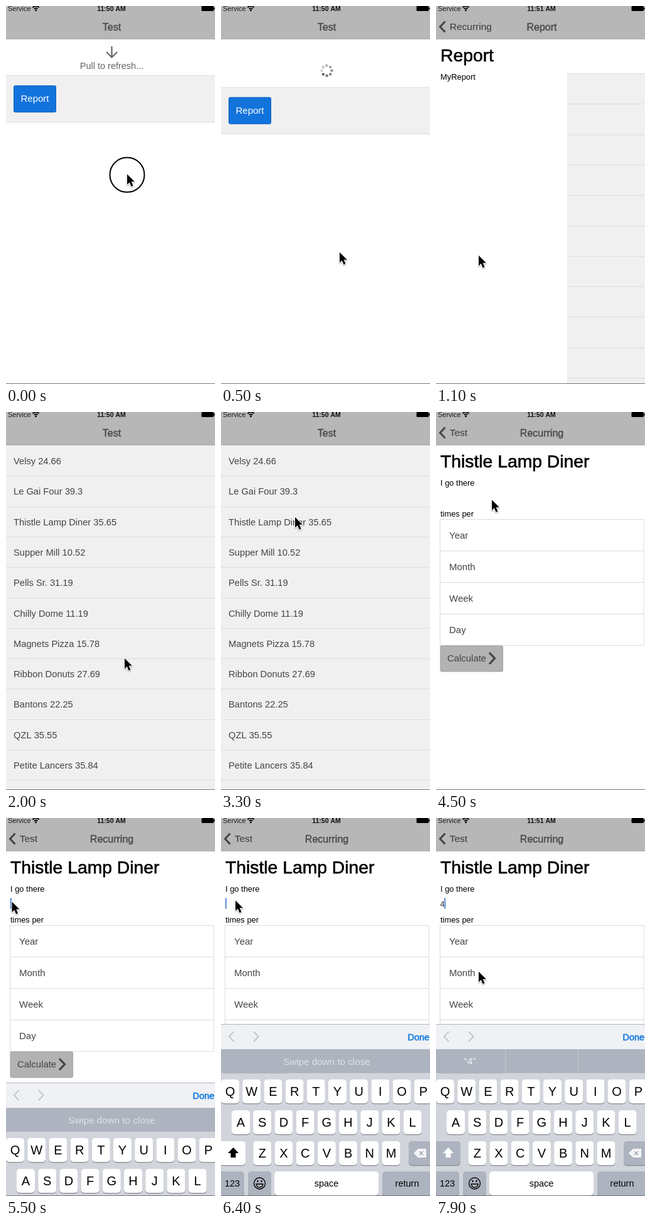
An HTML page with a canvas for the animation above (8000 ms loop, 333 by 600 pixels).

```html
<!DOCTYPE html>
<html lang="en">
<head>
<meta charset="utf-8">
<title>Expense list</title>
<style>
html, body { margin: 0; width: 100%; height: 100%; overflow: hidden; background: #fff; }
canvas { display: block; width: 333px; height: 600px; }
</style>
</head>
<body>
<canvas id="stage"></canvas>
<script>
const W = 333, H = 600, LOOP = 8000, STEP = 100, TOP = 53, ROW = 48.3;
const INK = '#444', LINE = '#dcdcdc';
const FONT = '"Liberation Sans", Arial, sans-serif';
const canvas = document.getElementById('stage');
const c = canvas.getContext('2d');
const dpr = window.devicePixelRatio || 1;
canvas.width = W * dpr;
canvas.height = H * dpr;

const places = [
  'Velsy 24.66', 'Le Gai Four 39.3', 'Thistle Lamp Diner 35.65', 'Supper Mill 10.52',
  'Pells Sr. 31.19', 'Chilly Dome 11.19', 'Magnets Pizza 15.78', 'Ribbon Donuts 27.69',
  'Bantons 22.25', 'QZL 35.55', 'Petite Lancers 35.84'
];

// Pointer stops: time, x, y
const path = [
  [0, 193, 267], [400, 189, 391], [2100, 189, 391], [2900, 118, 167],
  [4300, 118, 167], [4700, 60, 112], [5100, 9.5, 133], [5500, 9.5, 133],
  [6000, 23, 131], [6400, 23, 131], [6600, 33, 134], [6800, 33, 134],
  [7700, 62, 205], [7900, 68, 244]
];

const clamp = v => Math.max(0, Math.min(1, v));
const mix = (a, b, p) => a + (b - a) * p;
const span = (t, from, to) => clamp((t - from) / (to - from));
const easeOut = (p, n) => 1 - Math.pow(1 - p, n);

// cubic-bezier(.36, .66, .04, 1)
function pushEase(x) {
  const curve = (s, a, b) => 3 * s * (1 - s) * (1 - s) * a + 3 * s * s * (1 - s) * b + s * s * s;
  let lo = 0, hi = 1;
  for (let i = 0; i < 24; i++) {
    const mid = (lo + hi) / 2;
    if (curve(mid, .36, .04) < x) lo = mid; else hi = mid;
  }
  return x <= 0 ? 0 : x >= 1 ? 1 : curve(lo, .66, 1);
}

function pointerAt(t) {
  let i = 0;
  while (i < path.length - 2 && path[i + 1][0] <= t) i++;
  const [t0, x0, y0] = path[i], [t1, x1, y1] = path[i + 1];
  const p = span(t, t0, t1);
  return [mix(x0, x1, p), mix(y0, y1, p)];
}

function rect(x, y, w, h, fill) {
  c.fillStyle = fill;
  c.fillRect(x, y, w, h);
}

function round(x, y, w, h, r, fill, border) {
  c.beginPath();
  c.roundRect(x, y, w, h, r);
  c.fillStyle = fill;
  c.fill();
  if (border) {
    c.strokeStyle = border;
    c.lineWidth = 1;
    c.stroke();
  }
}

function line(points, color, width) {
  c.beginPath();
  points.forEach(([x, y]) => c.lineTo(x, y));
  c.strokeStyle = color;
  c.lineWidth = width;
  c.stroke();
}

// "heavy" thickens the strokes to a medium weight
function text(str, x, y, size, color, { align = 'left', bold = false, heavy = 0 } = {}) {
  c.font = (bold ? 'bold ' : '') + size + 'px ' + FONT;
  c.textAlign = align;
  c.fillStyle = color;
  c.fillText(str, x, y);
  if (heavy) {
    c.strokeStyle = color;
    c.lineWidth = heavy;
    c.lineJoin = 'round';
    c.strokeText(str, x, y);
    c.lineJoin = 'miter';
  }
}

function layer(alpha, draw) {
  c.save();
  c.globalAlpha *= alpha;
  draw();
  c.restore();
}

function statusBar(clock) {
  text('Service', 3, 8, 11, '#1c1c1c');
  text(clock, 168, 8, 10.5, '#111', { align: 'center', bold: true });
  c.strokeStyle = '#000';
  c.lineWidth = 1.8;
  for (const r of [3.6, 6.8]) {
    c.beginPath();
    c.arc(47.5, 7, r, -Math.PI * .77, -Math.PI * .23);
    c.stroke();
  }
  c.beginPath();
  c.arc(47.5, 6.8, 1.5, 0, 7);
  c.fillStyle = '#000';
  c.fill();
  round(311.5, 0, 19.5, 8, 1.5, '#000');
  rect(331.5, 2.5, 1.5, 3, '#000');
}

function bar(clock) {
  rect(0, 0, W, TOP, '#b7b7b7');
  rect(0, TOP - 1, W, 1, '#adadad');
  statusBar(clock);
}

const title = (str, x) => text(str, x, 38.5, 16, '#4b4b4b', { align: 'center', heavy: .45 });
const backText = str => text(str, 21.7, 38, 15.5, INK, { heavy: .15 });
const backArrow = () => line([[14.5, 24.5], [6.5, 33], [14.5, 41.5]], INK, 3);

function refresher(offset, flip, spin, busy) {
  const base = TOP + offset;
  c.save();
  c.beginPath();
  c.rect(0, TOP, W, offset);
  c.clip();
  if (busy) {
    for (let i = 0; i < 8; i++) {
      const a = i * Math.PI / 4 + spin;
      c.beginPath();
      c.arc(168.5 + 8 * Math.cos(a), base - 27 + 8 * Math.sin(a), 2.2, 0, 7);
      c.fillStyle = `rgba(102,102,102,${.3 + i * .1})`;
      c.fill();
    }
  } else {
    c.save();
    c.translate(168.5, base - 38);
    c.rotate(flip * Math.PI);
    line([[0, -9], [0, 8]], '#666', 2.2);
    line([[-8.5, 0], [0, 8.5], [8.5, 0]], '#666', 2.2);
    c.restore();
    text('Pull to refresh...', 168.5, base - 11, 14.5, '#666', { align: 'center' });
  }
  c.restore();
}

function emptyList(offset) {
  const y = TOP + offset;
  rect(0, y, W, 73.5, '#f0f0f0');
  rect(0, y - 1, W, 1, LINE);
  rect(0, y + 73, W, 1, LINE);
  round(12.5, y + 15.5, 67, 42, 2, '#1273dc', '#0c62bd');
  text('Report', 46, y + 41, 15, '#fff', { align: 'center' });
}

function list(offset, active) {
  const y = TOP + offset;
  rect(0, y, W, H - y, '#f0f0f0');
  for (let i = 0; i < 12; i++) {
    const top = y + i * ROW;
    if (active && i === 2) rect(0, top, W, ROW, '#dadada');
    if (i || offset) rect(0, Math.round(top), W, 1, LINE);
    if (places[i]) text(places[i], 12, top + 30, 14.7, INK);
  }
}

function heading(str) {
  text(str, 7, 87.5, 28.3, '#000', { heavy: .6 });
}

function form(value, caret) {
  rect(0, TOP, W, H - TOP, '#fff');
  heading('Thistle Lamp Diner');
  text('I go there', 7, 117, 12.9, '#000');
  if (value) text(value, 6.5, 140.5, 13.2, '#333');
  if (caret) rect(value ? 13.5 : 7, 127, 1.6, 17, '#3a74d0');
  text('times per', 7, 166, 12.9, '#000');
  ['Year', 'Month', 'Week', 'Day'].forEach((name, i) => {
    const y = 170 + i * 50;
    c.strokeStyle = LINE;
    c.lineWidth = 1;
    c.strokeRect(6.5, y + .5, 324.5, 50);
    text(name, 21, y + 31, 15, INK);
  });
  round(7, 371, 99.5, 41, 2, '#b2b2b2', '#a3a3a3');
  text('Calculate', 18, 396, 14.9, INK);
  line([[85, 382], [93.5, 391], [85, 400]], INK, 3.2);
}

function report() {
  rect(0, TOP, 209, H - TOP, '#fff');
  heading('Report');
  text('MyReport', 7, 117, 12.9, '#000');
}

function key(x, y, w, label, size, fill = '#fff') {
  round(x, y + 1.2, w, 38, 5, '#888c92');
  round(x, y, w, 38, 5, fill);
  if (label) text(label, x + w / 2, y + 19 + size * .36, size, '#000', { align: 'center' });
}

function shiftKey(on) {
  key(-6, 513, 45, '', 0, on ? '#fff' : '#adb3bf');
  c.beginPath();
  [[19.5, 523], [28, 532], [23.5, 532], [23.5, 539], [15.5, 539], [15.5, 532], [11, 532]]
    .forEach(([x, y]) => c.lineTo(x, y));
  c.fillStyle = on ? '#000' : '#fff';
  c.fill();
}

function deleteKey() {
  key(299, 513, 46, '', 0, '#adb3bf');
  c.beginPath();
  [[307, 532], [314, 525], [327, 525], [327, 539], [314, 539]].forEach(([x, y]) => c.lineTo(x, y));
  c.fillStyle = '#f4f5f7';
  c.fill();
  line([[316, 529], [322, 535]], '#9aa1ad', 1.4);
  line([[322, 529], [316, 535]], '#9aa1ad', 1.4);
}

function emojiKey() {
  key(43, 561, 37, '', 0, '#adb3bf');
  c.strokeStyle = '#000';
  c.fillStyle = '#000';
  c.lineWidth = 1.4;
  c.beginPath();
  c.arc(61.5, 580, 9, 0, 7);
  c.stroke();
  c.beginPath();
  c.arc(61.5, 581, 5.4, 0, Math.PI);
  c.closePath();
  c.stroke();
  for (const x of [58.5, 64.5]) {
    c.beginPath();
    c.ellipse(x, 576.5, 1.1, 1.7, 0, 0, 7);
    c.fill();
  }
}

function keyboard(shift, caps, suggest) {
  c.save();
  c.translate(0, Math.round(shift));
  rect(0, 327, W, 40, '#eff1f4');
  rect(0, 327, W, 1, '#b4b6b9');
  line([[20.5, 339], [13, 347], [20.5, 355]], '#b8bcc2', 1.7);
  line([[52, 339], [59.5, 347], [52, 355]], '#b8bcc2', 1.7);
  text('Done', 297.5, 352.5, 14.4, '#0f78e0', { heavy: .5 });
  rect(0, 367, W, 38.5, '#adb3bf');
  if (suggest) {
    rect(110.5, 368, 1, 37, '#c6cad2');
    rect(225.5, 368, 1, 37, '#c6cad2');
    text('\u201c4\u201d', 54, 390.5, 15.5, '#f3f4f6', { align: 'center' });
  } else {
    text('Swipe down to close', 168.5, 391.5, 15.2, '#dfe2e7', { align: 'center' });
  }
  rect(0, 405.5, W, 195, '#d1d5db');
  [['QWERTYUIOP', 0, 415], ['ASDFGHJKL', 17, 464], ['ZXCVBNM', 51.3, 513]].forEach(([keys, x, y]) =>
    [...keys].forEach((k, i) => key(x + i * 34.2, y, 29, k, 20)));
  shiftKey(caps);
  deleteKey();
  key(-6, 561, 43, '', 0, '#adb3bf');
  text('123', 18, 585, 14.5, '#000', { align: 'center' });
  emojiKey();
  key(85, 561, 166, 'space', 14.5);
  key(257, 561, 79, 'return', 14.5, '#adb3bf');
  c.restore();
}

function pointer(x, y) {
  c.save();
  c.translate(x, y);
  c.scale(1.06, 1.06);
  c.beginPath();
  [[0, 0], [0, 15.5], [3.6, 12.2], [6.2, 18.4], [9, 17.2], [6.4, 11.2], [11.2, 11.2]]
    .forEach(([px, py]) => c.lineTo(px, py));
  c.closePath();
  c.shadowColor = 'rgba(0,0,0,.35)';
  c.shadowBlur = 2 * dpr;
  c.shadowOffsetY = dpr;
  c.lineJoin = 'round';
  c.lineWidth = 2;
  c.strokeStyle = '#fff';
  c.stroke();
  c.shadowColor = 'transparent';
  c.fillStyle = '#000';
  c.fill();
  c.restore();
}

function listScene(t) {
  const drag = 58 + (pointerAt(t)[1] - 267) * .4;
  const settle = easeOut(span(t, 400, 800), 3);
  let offset = t <= 400 ? drag : mix(drag, 54, settle);
  if (t >= 1600) offset = 54 * (1 - easeOut(span(t, 1600, 2000), 2));
  if (offset > 0) refresher(offset, span(t, 0, 200), t / 160, t >= 500);
  if (t < 700) emptyList(offset); else list(offset, t >= 3400);
}

function pushScene(t) {
  const p = pushEase(span(t, 3542, 4142));
  c.save();
  c.translate(-114 * p, 0);
  list(0, true);
  c.restore();
  rect(0, TOP, W, H - TOP, `rgba(0,0,0,${.1 * p})`);
  const x = Math.round(W * (1 - p));
  if (x > 0) {
    const g = c.createLinearGradient(x - 8, 0, x, 0);
    g.addColorStop(0, 'rgba(0,0,0,0)');
    g.addColorStop(1, 'rgba(0,0,0,.28)');
    rect(x - 8, TOP, 8, H - TOP, g);
  }
  c.save();
  c.translate(x, 0);
  form('', false);
  c.restore();
  bar('11:50 AM');
  const swap = span(p, .8, 1);
  layer((1 - .7 * p) * (1 - swap), () => title('Test', mix(168.5, 36, p)));
  layer(swap, () => backText('Test'));
  layer(p, () => { backArrow(); title('Recurring', 168.5 + 205 * (1 - p)); });
}

function formScene(t) {
  form(t >= 6500 ? '4' : '', t >= 5400);
  const up = easeOut(span(t, 5382, 5882), 4);
  if (up > 0) keyboard(273 * (1 - up), t < 6500, t >= 6900);
  bar(t >= 7800 ? '11:51 AM' : '11:50 AM');
  backArrow();
  backText('Test');
  title('Recurring', 168.5);
}

function draw(t) {
  c.setTransform(dpr, 0, 0, dpr, 0, 0);
  rect(0, 0, W, H, '#fff');
  let [x, y] = pointerAt(t);
  if (t < 3500) {
    listScene(t);
    const inReport = t >= 1100 && t < 1600;
    bar(inReport ? '11:51 AM' : '11:50 AM');
    if (inReport) {
      report();
      if (t >= 1400) rect(209, TOP, 107, H - TOP, '#fff');
      backArrow();
      backText('Recurring');
      title('Report', 168.5);
      [x, y] = [68, 396];
    } else {
      title('Test', 168.5);
    }
  } else if (t < 4200) {
    pushScene(t);
  } else {
    formScene(t);
  }
  rect(0, 599, W, 1, '#777');
  if (t < 500) {
    c.beginPath();
    c.arc(x, y + 1, 27.5, 0, 7);
    c.strokeStyle = '#000';
    c.lineWidth = 2;
    c.stroke();
  }
  pointer(x, y);
}

const start = performance.now();
function tick() {
  const t = (performance.now() - start) % LOOP;
  draw(Math.floor(t / STEP) * STEP);
  requestAnimationFrame(tick);
}
tick();
</script>
</body>
</html>
```
